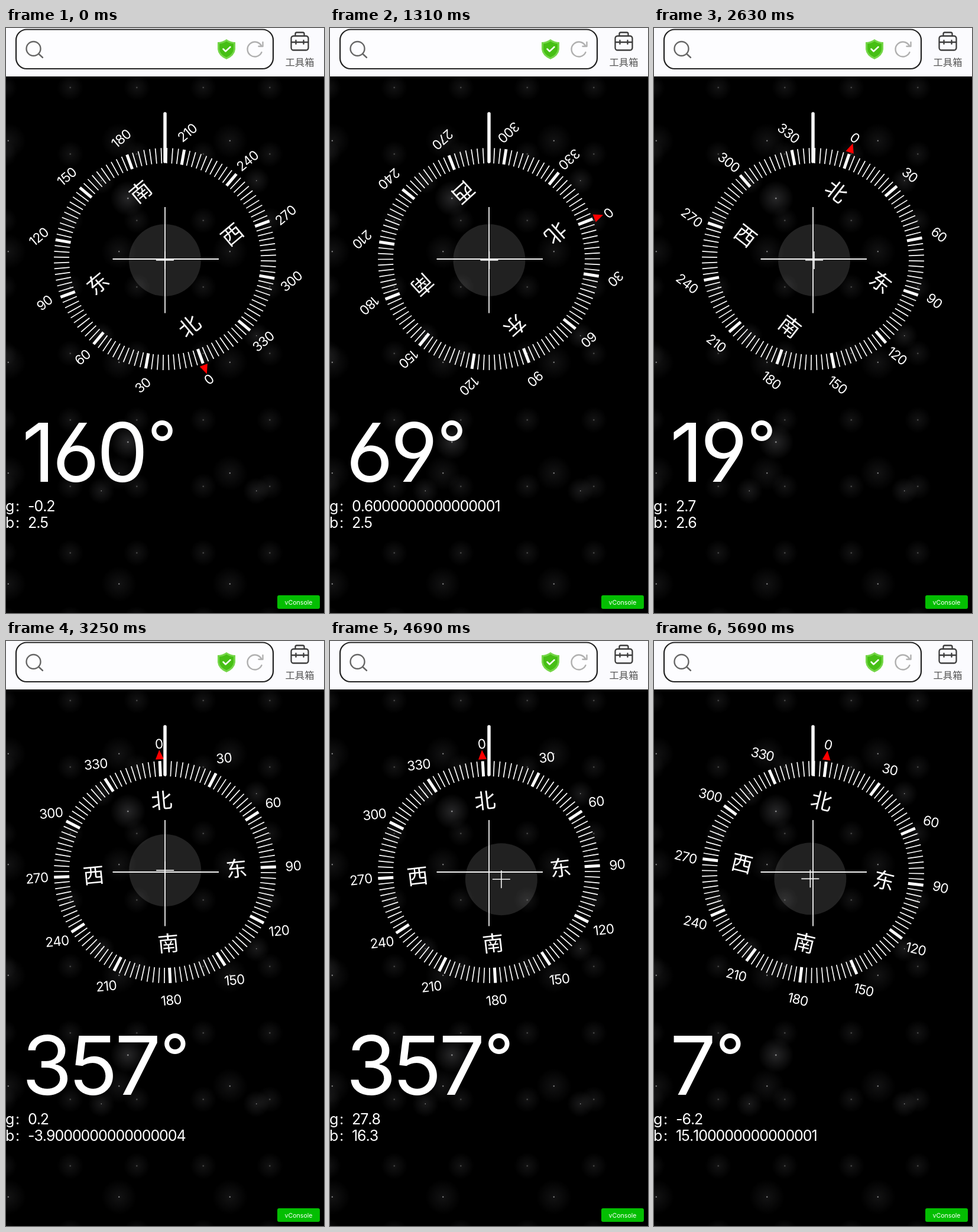
Animation, 538 px wide and 990 px high, one loop 5.75 s. Source, as an HTML page:

```html
<!DOCTYPE html>
<html lang="zh">
<head>
<meta charset="utf-8">
<title>Compass</title>
<style>
  html, body { margin: 0; width: 100%; height: 100%; overflow: hidden; background: #000; }
  /* Four layers of repeating stars */
  #sky {
    position: absolute; left: 0; top: 82px; width: 538px; height: 908px;
    background-image:
      radial-gradient(#fff, rgba(245,245,255,.15) 1.5px, transparent 30px),
      radial-gradient(#fff, rgba(245,245,255,.1) .75px, transparent 22.5px),
      radial-gradient(#fff, rgba(245,245,255,.07) 1.5px, transparent 30px),
      radial-gradient(rgba(255,255,255,.5), rgba(245,245,255,.07) 1.5px, transparent 22.5px);
    background-size: 412.5px 412.5px, 262.5px 262.5px, 187.5px 187.5px, 112.5px 112.5px;
    background-position: 0 0, 30px 45px, 97.5px 202.5px, 52.5px 75px;
  }
  svg { position: absolute; left: 0; top: 0; display: block; }
  text {
    font-family: Inter, "Noto Sans CJK SC", sans-serif; fill: #fff;
    letter-spacing: -.036em; font-kerning: none;
  }
  .mid { text-anchor: middle; }
  .num { font-size: 22.5px; }
  .cjk { font-family: "Noto Sans CJK SC", "Noto Sans CJK", sans-serif; letter-spacing: 0; }
  .side { font-size: 36px; }
  #heading { font-size: 138px; font-feature-settings: "cv03", "cv04"; }
  .value { font-size: 25px; letter-spacing: -.042em; }
  .line { fill: none; stroke-linecap: round; stroke-linejoin: round; }
</style>
</head>
<body>
<div id="sky"></div>
<svg width="538" height="990" viewBox="0 0 538 990">
  <!-- Browser bar -->
  <rect width="538" height="82" fill="#fbfbfe"/>
  <rect x="17" y="2.5" width="435" height="66.5" rx="18" fill="#fdfdff" stroke="#222" stroke-width="2.2"/>
  <g class="line" stroke="#666" stroke-width="2.4">
    <circle cx="46.5" cy="35" r="12"/>
    <path d="M55.5 44L62 50"/>
  </g>
  <path d="M373 19Q380 24 388 24V36Q387 47 373 53Q359 47 358 36V24Q366 24 373 19Z" fill="#74d648"/>
  <path d="M373 22.5Q379 26.5 385 26.7V36Q384 45 373 49.5Q362 45 361 36V26.7Q367 26.5 373 22.5Z" fill="#46bf14"/>
  <path class="line" d="M367.5 35.5L371.5 39.5L379.5 32" stroke="#fff" stroke-width="2.5"/>
  <path class="line" d="M432.5 41A12.5 12.5 0 1 1 432 30M434.5 24V31H427.5" stroke="#b0b0b0" stroke-width="2.4"/>
  <g class="line" stroke="#3c3c3c" stroke-width="2.3">
    <rect x="482.5" y="13.5" width="29" height="24" rx="4"/>
    <path d="M489.5 13V10Q489.5 7.5 492 7.5H502Q504.5 7.5 504.5 10V13M483 24H511M490.5 21V27M503.5 21V27"/>
  </g>
  <text class="mid cjk" x="497" y="64" font-size="16.3" style="fill:#555">工具箱</text>

  <!-- Compass -->
  <g transform="translate(269 391)">
    <g id="bubble">
      <circle r="61" fill="rgba(255,255,255,.13)"/>
      <path d="M-15 0H15M0 -15V15" stroke="#f4f4f4" stroke-width="1.6"/>
    </g>
    <path d="M-88.5 0H91M0 -88V91.5" stroke="#f4f4f4" stroke-width="1.8"/>
    <g id="dial"><path d="M-7 -191H7L0 -207Z" fill="#f00"/></g>
    <g id="labels"></g>
    <path class="line" d="M0 -246V-165" stroke="#fff" stroke-width="5.5"/>
  </g>

  <!-- Readings -->
  <text id="heading" x="27" y="768"><tspan id="degrees"></tspan><tspan font-size="108" dx="4" dy="-25">°</tspan></text>
  <text class="value" x="-1" y="818">g</text><text class="value" x="16" y="818">:</text>
  <text class="value" x="-1" y="846">b</text><text class="value" x="16" y="846">:</text>
  <text class="value" id="gamma" x="37" y="818"></text>
  <text class="value" id="beta" x="37" y="846"></text>

  <rect x="459" y="960" width="72" height="23" rx="3" fill="#04be02"/>
  <text class="mid" x="495" y="975.5" font-size="10.6" style="letter-spacing:0">vConsole</text>
</svg>
<script>
const LOOP = 5750, STEP = 62.5, LAST_STEP = 91;
// step, heading, gamma, beta
const POSES = [
  [0, 160, -0.2, 2.5],
  [13, 98.2, 0.5, 2.9],
  [29, 39.5, 0.6, 2.1],
  [42, 19, 2.7, 2.6],
  [52, -2.7, 0.2, -3.9],
  [75, -3.3, 27.8, 16.3],
  [91, 6.8, -6.2, 15.1]
];
const $ = id => document.getElementById(id);

function add(parent, name, attrs) {
  const node = document.createElementNS('http://www.w3.org/2000/svg', name);
  for (const key in attrs) node.setAttribute(key, attrs[key]);
  return parent.appendChild(node);
}

for (let angle = 0; angle < 360; angle += 3) {
  add($('dial'), 'path', {
    d: 'M0 -188V-162', transform: `rotate(${angle})`,
    stroke: '#fff', 'stroke-width': angle % 30 ? 1.7 : 5
  });
}

const labels = [];
function addLabel(content, angle, radius, cls, y) {
  const node = add($('labels'), 'text', { class: 'mid ' + cls, y });
  node.textContent = content;
  labels.push({ node, angle, radius });
}
for (let angle = 0; angle < 360; angle += 30) addLabel(angle, angle, 217, 'num', 8);
[...'北东南西'].forEach((name, i) => addLabel(name, i * 90, 121, 'cjk side', 13));

function poseAt(step) {
  let i = 1;
  while (step > POSES[i][0]) i++;
  const from = POSES[i - 1], to = POSES[i];
  const k = (step - from[0]) / (to[0] - from[0]);
  return from.map((v, n) => v + (to[n] - v) * k).slice(1);
}

// Tenths times 0.1 keeps the raw floating point tails in the readout
const tenths = v => String(Math.round(v * 10) * 0.1);

function draw(time) {
  const step = Math.min(LAST_STEP, Math.floor((time % LOOP + 5) / STEP));
  const [heading, gamma, beta] = poseAt(step);

  $('dial').setAttribute('transform', `rotate(${heading})`);
  for (const { node, angle, radius } of labels) {
    const a = (angle + heading) * Math.PI / 180;
    const x = radius * Math.sin(a), y = -radius * Math.cos(a);
    node.setAttribute('transform', `translate(${x} ${y}) rotate(${2 * heading})`);
  }
  $('bubble').setAttribute('transform', `translate(${gamma * 0.75} ${beta * 0.75})`);
  $('degrees').textContent = Math.round(heading + 360) % 360;
  $('gamma').textContent = tenths(gamma);
  $('beta').textContent = tenths(beta);
}

const start = performance.now();
function tick() {
  draw(performance.now() - start);
  requestAnimationFrame(tick);
}
tick();
</script>
</body>
</html>
```
